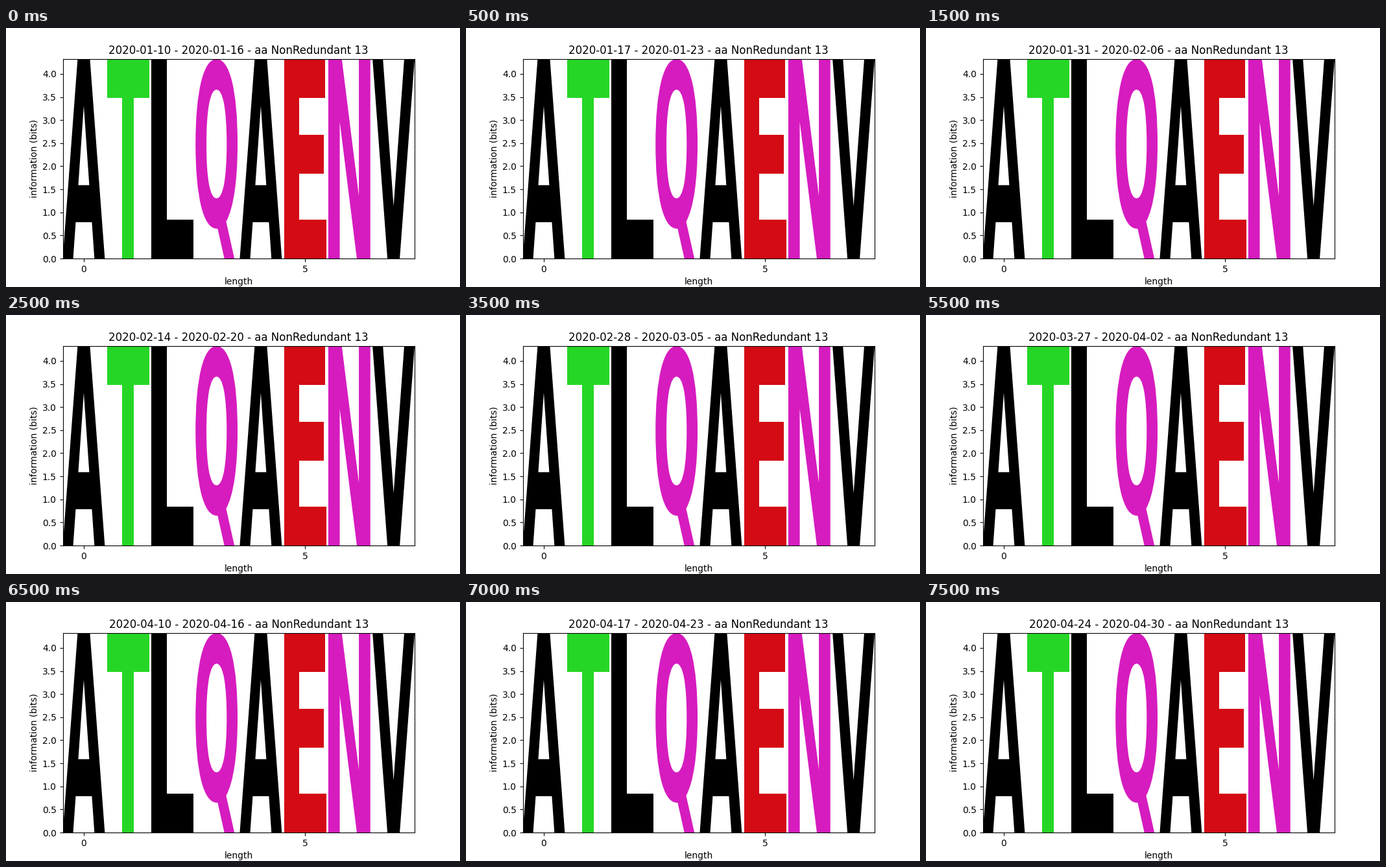
Write a matplotlib script that moves like this. It is 700x400 px and loops after 8 s.

```python
import numpy as np
import matplotlib.pyplot as plt
from matplotlib.animation import FuncAnimation
from matplotlib.patches import PathPatch
from matplotlib.textpath import TextPath
from matplotlib.transforms import Affine2D

WORD = "ATLQAENV"
WIDTH = 0.95
BITS = np.log2(20)
WEEKS = 16
START = np.datetime64("2020-01-10")

BLACK, GREEN = (0, 0, 0), (0.15, 0.84, 0.15)
RED, MAGENTA = (0.83, 0.04, 0.08), (0.84, 0.11, 0.75)
COLORS = {"T": GREEN, "E": RED, "Q": MAGENTA, "N": MAGENTA}
FONT = {"family": "DejaVu Sans", "weight": "bold"}


def add_letter(ax, char, pos):
    """Stretch one glyph to fill its column."""
    path = TextPath((0, 0), char, size=100, prop=FONT)
    box = path.get_extents()
    fit = (Affine2D()
           .translate(-box.x0, -box.y0)
           .scale(WIDTH / box.width, BITS / box.height)
           .translate(pos - WIDTH / 2, 0))
    ax.add_patch(PathPatch(fit.transform_path(path), linewidth=0,
                           facecolor=COLORS.get(char, BLACK)))


def week_title(i):
    first = START + 7 * i
    return f"{first} - {first + 6} - aa NonRedundant 13"


plt.rcParams["font.family"] = "DejaVu Sans"
fig, ax = plt.subplots(figsize=(7, 4), dpi=100)
for pos, char in enumerate(WORD):
    add_letter(ax, char, pos)

ax.set_xlim(-WIDTH / 2, len(WORD) - 1 + WIDTH / 2)
ax.set_ylim(0, BITS)
ax.set_xticks([0, 5])
ax.set_yticks(np.arange(0, BITS, 0.5))
ax.set_xlabel("length")
ax.set_ylabel("information (bits)")
title = ax.set_title(week_title(0))


def update(i):
    title.set_text(week_title(i))
    return [title]


anim = FuncAnimation(fig, update, frames=WEEKS, interval=500,
                     repeat=True, repeat_delay=0, blit=False)
plt.show()
```
